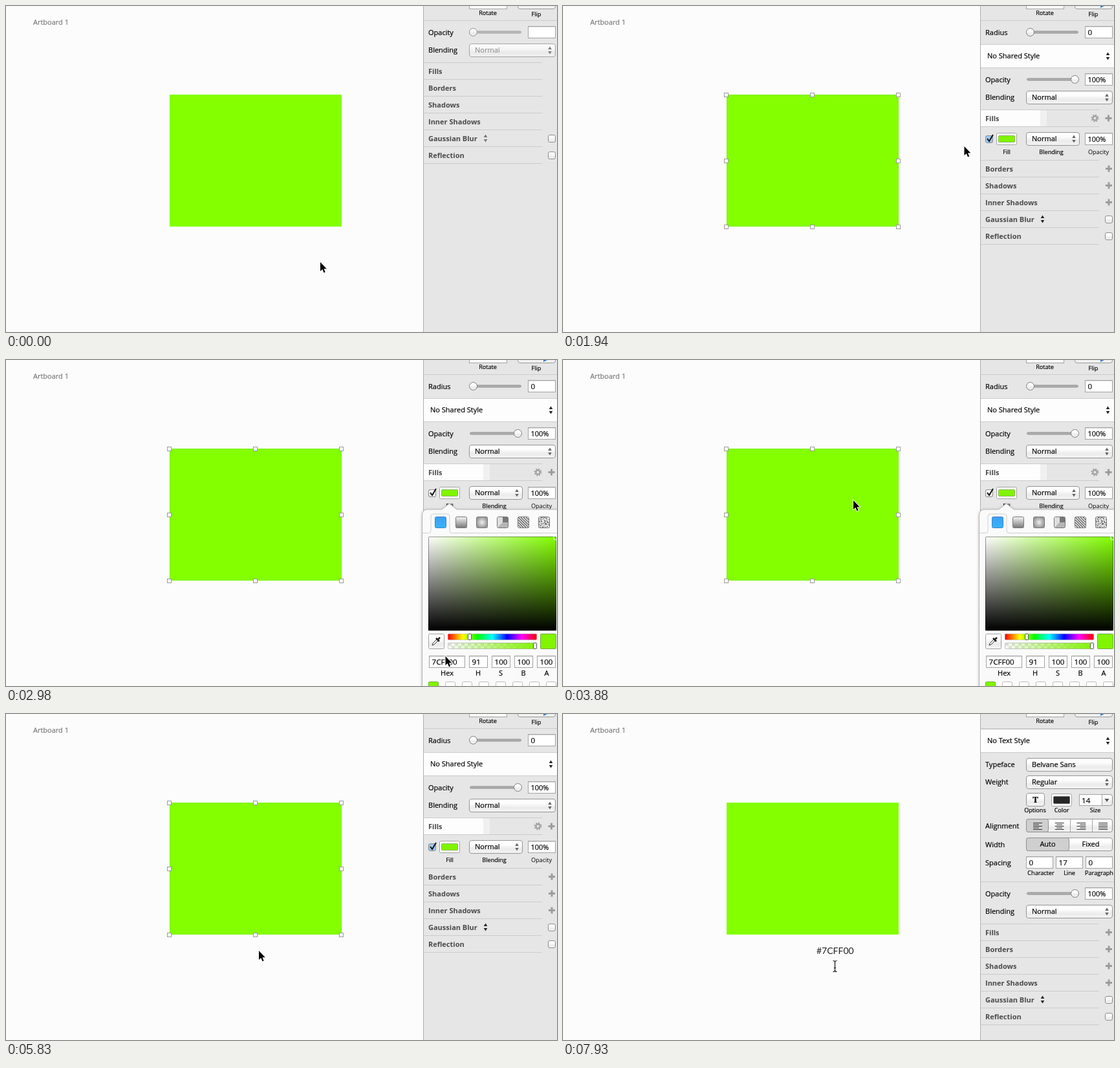
Animation of 852x504 px, one loop 8000 ms. Source, as an HTML page:

```html
<!DOCTYPE html>
<html lang="en">
<head>
<meta charset="utf-8">
<title>Copying a fill colour</title>
<style>
html, body { margin: 0; width: 100%; height: 100%; overflow: hidden; background: #fcfcfc; }
svg { display: block; }
text { font: 11px "Open Sans", "Noto Sans", sans-serif; fill: #000; stroke: #000; stroke-width: .2; white-space: pre; }
.small { font-size: 9.1px; text-anchor: middle; }
.mid { text-anchor: middle; }
.head { font-weight: 700; fill: #4a4a4a; stroke: none; }
.num { font-size: 11.6px; }
.plain { stroke: none; }
.off { opacity: .8; }
.off text { fill: #6c6c6c; stroke: none; }
</style>
</head>
<body>
<svg id="stage" width="852" height="504" viewBox="0 0 852 504"></svg>
<script>
const LOOP = 8000, GREEN = '#83ff00';

// Drawing helpers: each returns SVG markup.
const rect = (x, y, w, h, fill, extra = '') =>
  `<rect x="${x}" y="${y}" width="${w}" height="${h}" fill="${fill}" ${extra}/>`;
const box = (x, y, w, h, fill = '#fff', r = 0, stroke = '#a3a3a3') =>
  rect(x + .5, y + .5, w - 1, h - 1, fill, `rx="${r}" stroke="${stroke}"`);
const text = (x, y, s, cls = '') => `<text x="${x}" y="${y}" class="${cls}">${s}</text>`;
const path = (d, fill, extra = '') => `<path d="${d}" fill="${fill}" ${extra}/>`;
const line = (y, x2 = 829) => rect(646, y, x2 - 646, 1, '#cbcbcb');
const arrows = (x, y, c = '#222') =>
  path(`M${x - 2.8} ${y - 1.5}h5.6l-2.8-4.5zM${x - 2.8} ${y + 1.5}h5.6l-2.8 4.5z`, c);
const plus = (x, y) => path(`M${x - 5} ${y}h10M${x} ${y - 5}v10`, 'none', 'stroke="#9c9c9c" stroke-width="3"');
const checkbox = (x, y, fill = 'url(#button)') => box(x, y, 12, 12, fill, 2.5, '#8c8c8c');
const field = (x, y, w, s = '', cls = 'num') =>
  box(x, y, w, 19) + rect(x + 1, y + 1, w - 2, 1, '#dedede') + text(x + 4.5, y + 14, s, cls);
const button = (x, y, w, s = '', h = 21) =>
  box(x, y, w, h, 'url(#button)', 3.5, '#949494') + text(x + 9, y + 14, s);
const popup = (x, y, w, s) => button(x, y, w, s) + arrows(x + w - 9, y + 10.5, '#666');
const slider = (y, knob) =>
  box(717, y - 2, 80, 4, '#b4b4b4', 2, '#8a8a8a') +
  `<circle cx="${knob}" cy="${y}" r="6" fill="url(#button)" stroke="#7c7c7c"/>`;
const well = (x, y, w, h, color) =>
  box(x, y, w, h, '#fff', 2) + box(x + 3, y + 4, w - 6, h - 8, color, 1, '#0004');

function blendRows(y, enabled) {
  const cls = enabled ? '' : 'off';
  return text(653, y + 14, 'Opacity') + text(653, y + 41, 'Blending') +
    `<g class="${cls}">${slider(y + 9.5, enabled ? 791.5 : 722.5)}</g>` +
    field(807, y, 43, enabled ? '100%' : '', '') +
    `<g class="${cls}">${popup(716, y + 27, 134, 'Normal')}</g>`;
}

function sections(y, names, enabled) {
  let out = '';
  for (const name of names) {
    out += line(y) + text(653, y + 18, name, 'head');
    if (name === 'Gaussian Blur') out += arrows(741.5, y + 13.5, enabled ? '#222' : '#777');
    if (/Blur|Reflection/.test(name)) out += checkbox(838, y + 8);
    else if (enabled) out += plus(844, y + 13.5);
    y += 26;
  }
  return out + line(y);
}

const effects = ['Borders', 'Shadows', 'Inner Shadows', 'Gaussian Blur', 'Reflection'];
const styleBox = (y, s) =>
  rect(646, y, 206, 37, '#fdfdfd') + line(y, 852) + line(y + 36, 852) +
  text(656, y + 22, s) + arrows(842.5, y + 18.5);

const emptyPanel = () => blendRows(31, false) + sections(87, ['Fills', ...effects], false);

function gear(x, y) {
  return `<circle cx="${x}" cy="${y}" r="3.2" fill="none" stroke="#a2a2a2" stroke-width="2.4"/>` +
    `<circle cx="${x}" cy="${y}" r="5" fill="none" stroke="#a2a2a2" stroke-width="2" stroke-dasharray="2 1.93"/>`;
}

function shapePanel() {
  return text(653, 45, 'Radius') + slider(40.5, 722.5) + field(807, 31, 43, '0') +
    styleBox(59, 'No Shared Style') + blendRows(104, true) +
    rect(646, 160, 92, 26, '#fdfdfd') + rect(738, 160, 10, 26, '#f0f0f0') + line(160) + line(186) +
    text(653, 178, 'Fills', 'head') + gear(822.5, 173.5) + plus(843.5, 173.5) +
    group('blueCheck', checkbox(653, 200, '#9cc9ef')) + group('plainCheck', checkbox(653, 200)) +
    path('M656 205l3 4 6-10', 'none', 'stroke="#111" stroke-width="2"') +
    well(670, 196, 32, 19, '#80f400') + popup(716, 195, 83, 'Normal') +
    field(807, 196, 43, '100%', '') + text(686, 229, 'Fill', 'small') +
    text(755, 229, 'Blending', 'small') + text(828, 229, 'Opacity', 'small plain') +
    sections(238, effects, true);
}

function alignIcon(i) {
  const x = 727 + i * 33.7;
  return [14, 9, 14, 9, 14].map((w, row) => {
    const width = i === 3 ? 14 : w;
    return rect(x + [0, (14 - width) / 2, 14 - width, 0][i], 168 + row * 2.5, width, 1, '#333');
  }).join('');
}

function textPanel() {
  const divider = (x, y) => rect(x, y, 1, 19, '#a0a0a0');
  return styleBox(23, 'No Text Style') +
    text(653, 82, 'Typeface') + button(716, 68, 134, 'Belvane Sans') +
    text(653, 109, 'Weight') + popup(716, 95, 134, 'Regular') +
    button(716, 122, 29) +
    `<text x="730.5" y="137" text-anchor="middle" style="font:bold 13px 'Noto Serif',serif">T</text>` +
    well(755, 123, 32, 20, '#262626') +
    button(798, 124, 52, '', 18) + box(798, 124, 36, 18) + text(802, 137.5, '14', 'num') +
    path('M837.5 131h7l-3.5 5z', '#555') +
    text(730, 152, 'Options', 'small') + text(771, 152, 'Color', 'small') + text(823, 152, 'Size', 'small') +
    text(653, 177, 'Alignment') + button(716, 162, 134) + box(716, 162, 35, 21, '#cfcfcf', 3, '#8e8e8e') +
    divider(784, 163) + divider(818, 163) + [0, 1, 2, 3].map(alignIcon).join('') +
    text(653, 206, 'Width') + button(716, 191, 134) + box(716, 191, 67, 21, '#cfcfcf', 3, '#8e8e8e') +
    text(749.5, 205, 'Auto', 'mid') + text(816, 205, 'Fixed', 'mid') +
    text(653, 234, 'Spacing') + field(716, 220, 42, '0') + field(762, 220, 42, '17') + field(808, 220, 42, '0') +
    text(739, 249, 'Character', 'small') + text(783, 249, 'Line', 'small') + text(829, 249, 'Paragraph', 'small') +
    line(259, 852) + blendRows(268, true) + sections(324, ['Fills', ...effects], true);
}

const random = seed => Math.abs(Math.sin(seed * 127.1) * 43758.5453) % 1;

function fillIcons() {
  const fills = ['url(#blue)', 'url(#steel)', 'url(#radial)', '#b5b5b5', '#f4f4f4', '#e4e4e4'];
  let out = fills.map((f, i) => box(663 + i * 32, 242, 18, 18, f, 2, i ? '#777' : '#3b87c8')).join('');
  out += path('M768 251V243h8v8z', '#777') + path('M768 251L760 259V243h8z', '#dedede');
  for (let i = -3; i < 4; i++) {
    const a = Math.max(0, -i * 4), b = Math.min(16, 16 - i * 4);
    out += path(`M${792 + a + i * 4} ${243 + a}L${792 + b + i * 4} ${243 + b}`, 'none', 'stroke="#666" stroke-width="1.5"');
  }
  for (let i = 1; i < 100; i++)
    out += rect(824 + Math.floor(random(i) * 16), 243 + Math.floor(random(i + 200) * 16), 1, 1, '#666');
  return out;
}

function colorPopover() {
  let out = path('M643.5 510V240q0-9 9-9H674L685.5 222 697 231H860V510z', '#fafafa',
    'stroke="#b4b4b4" filter="url(#shadow)"');
  out += path('M644 267.5H654q3 0 3-4V242q0-4 4-4h21q4 0 4 4v21.5q0 4 3 4H852', 'none', 'stroke="#cfcfcf"');
  out += fillIcons();
  out += rect(653, 273, 198, 145, 'url(#saturation)') + rect(653, 273, 198, 145, 'url(#shade)') +
    box(653, 273, 198, 146, 'none', 1, '#0006') +
    '<circle cx="849.5" cy="275" r="3" fill="none" stroke="#fff"/>';
  out += box(653, 423, 25, 24, 'url(#button)', 2) +
    path('M659 441l1-3 7-7 2 2-7 7z', '#fff', 'stroke="#333"') +
    path('M665 430l5 5M668 432l3-3', 'none', 'stroke="#222" stroke-width="2.5"');
  out += box(683, 423, 138, 10, 'url(#hue)', 1, '#0002') + box(714, 423, 6, 10, '#fff', 1, '#555');
  for (let i = 0; i < 27; i++) out += rect(684 + i * 5, 438 + i % 2 * 4, 5, 4, '#dedede');
  out += box(683, 437, 138, 10, 'url(#alpha)', 1, '#0003') + box(815, 437, 6, 10, '#fff', 1, '#555');
  out += box(826, 423, 25, 24, '#80f400', 1, '#7aa84c');
  [['Hex', '7CFF00', 654, 56, 682], ['H', '91', 716, 29, 730], ['S', '100', 751, 29, 765],
   ['B', '100', 786, 29, 800], ['A', '100', 821, 29, 836]].forEach(([label, value, x, w, mid]) => {
    out += field(x, 457, w, value) + text(mid, 488, label, 'mid');
  });
  for (let i = 0; i < 8; i++) out += box(653 + i * 26, 497, 16, 16, '#fff', 2, '#bcbcbc');
  return out + group('savedSwatch', box(653, 497, 16, 16, '#80f400', 2, '#71b52c'));
}

function handles() {
  let out = box(253, 137, 266, 204, 'none', 0, '#7cee08');
  for (const x of [253, 386, 519]) for (const y of [137, 239, 341])
    if (x !== 386 || y !== 239) out += box(x - 4, y - 3, 7, 7, '#fff', 0, '#9a9a9a');
  return out;
}

const gradient = (id, colors, vertical) =>
  `<linearGradient id="${id}" x2="${vertical ? 0 : 1}" y2="${vertical ? 1 : 0}">` +
  colors.map((c, i) => `<stop offset="${i / (colors.length - 1)}" stop-color="${c}"/>`).join('') + '</linearGradient>';

const group = (id, content) => `<g id="${id}">${content}</g>`;

document.getElementById('stage').innerHTML = '<defs>' +
  gradient('button', ['#fff', '#fdfdfd', '#ebebeb', '#f5f5f5'], true) +
  gradient('blue', ['#3f9ff5', '#35b4f8'], true) + gradient('steel', ['#f6f6f6', '#777'], true) +
  gradient('saturation', ['#fff', GREEN]) + gradient('shade', ['#0000', '#000'], true) +
  gradient('hue', ['#f00', '#ff0', '#0f0', '#0ff', '#00f', '#f0f', '#f00']) +
  gradient('alpha', ['#80f40000', '#80f400']) +
  '<radialGradient id="radial"><stop stop-color="#f0f0f0"/><stop offset="1" stop-color="#999"/></radialGradient>' +
  '<filter id="shadow"><feDropShadow dx="0" dy="1" stdDeviation="2" flood-opacity=".25"/></filter></defs>' +
  rect(0, 0, 852, 504, '#fcfcfc') + `<g opacity=".52">${text(42, 29, 'Artboard 1')}</g>` +
  rect(253, 137, 266, 204, GREEN) + group('handles', handles()) +
  rect(646, 0, 206, 504, '#e6e6e6') + rect(645, 0, 1, 504, '#b0b0b0') +
  box(716, -14, 59, 19) + box(791, -16, 59, 21, 'url(#button)', 3.5, '#989898') +
  group('flipIcon', path('M831 0h6l-6 3z', '#3a78c8')) +
  text(745, 14, 'Rotate', 'small') + text(820, 16, 'Flip', 'small') + line(22, 852) +
  group('emptyPanel', emptyPanel()) + group('shapePanel', shapePanel()) + group('textPanel', textPanel()) +
  group('popover', colorPopover()) +
  group('placeholder', rect(392, 357, 99, 17, '#b3d4fd') +
    `<text x="392" y="371" class="plain" style="font:13.8px 'Liberation Sans',sans-serif;fill:#333">Type something</text>`) +
  group('pasted', `<text x="392" y="371" class="plain" style="font:14px Lato,sans-serif;fill:#222">#7CFF00</text>`) +
  group('arrow', path('M.5 1V15L3.7 12 6 17.3 8.2 16.4 6 11.2H10.3z', '#000',
    'stroke="#fff" stroke-width="1.8" paint-order="stroke"')) +
  group('beam', path('M-3-8.5q3 0 3 2 0-2 3-2M0-7V7M-3 8.5q3 0 3-2 0 2 3 2M-1.5 2.5h3', 'none', 'stroke="#111" stroke-width="1.2"'));

// Pointer poses: time, x, y.
const poses = [
  [0, 485.5, 395], [450, 478, 372], [600, 457, 312], [750, 441, 262], [900, 437.5, 250],
  [1500, 452, 247], [1650, 525, 233], [1800, 620, 216], [1950, 680, 207], [2090, 684, 206],
  [2240, 688, 245], [2390, 700, 340], [2540, 707, 404], [2690, 702, 418], [2840, 688, 444], [2980, 679, 457],
  [3430, 640, 425], [3580, 545, 325], [3730, 470, 239], [3880, 448.5, 216],
  [4930, 443, 252], [5080, 435, 279], [5380, 430, 292], [5530, 413, 325], [5680, 396, 355], [5830, 390.5, 365],
  [6130, 391.5, 366], [7780, 408, 380], [7930, 420.5, 390]
];

// Visible interval of each switchable part.
const spans = {
  emptyPanel: [0, 900], shapePanel: [900, 6580], textPanel: [6580, LOOP], flipIcon: [900, LOOP],
  handles: [900, 6130], popover: [2090, 5380], plainCheck: [2090, 5380], savedSwatch: [2240, 5380],
  placeholder: [6580, 7480], pasted: [7480, LOOP], arrow: [0, 6130], beam: [6130, LOOP]
};
const parts = Object.entries(spans).map(([id, span]) => [document.getElementById(id), span]);
const pointers = ['arrow', 'beam'].map(id => document.getElementById(id));

function draw(now) {
  const t = now % LOOP;
  for (const [node, [from, to]] of parts) node.style.display = t >= from && t < to ? '' : 'none';
  const [, x, y] = poses.findLast(pose => pose[0] <= t);
  for (const node of pointers) node.setAttribute('transform', `translate(${x} ${y})`);
}

function tick() {
  draw(performance.now());
  requestAnimationFrame(tick);
}
tick();
</script>
</body>
</html>
```
